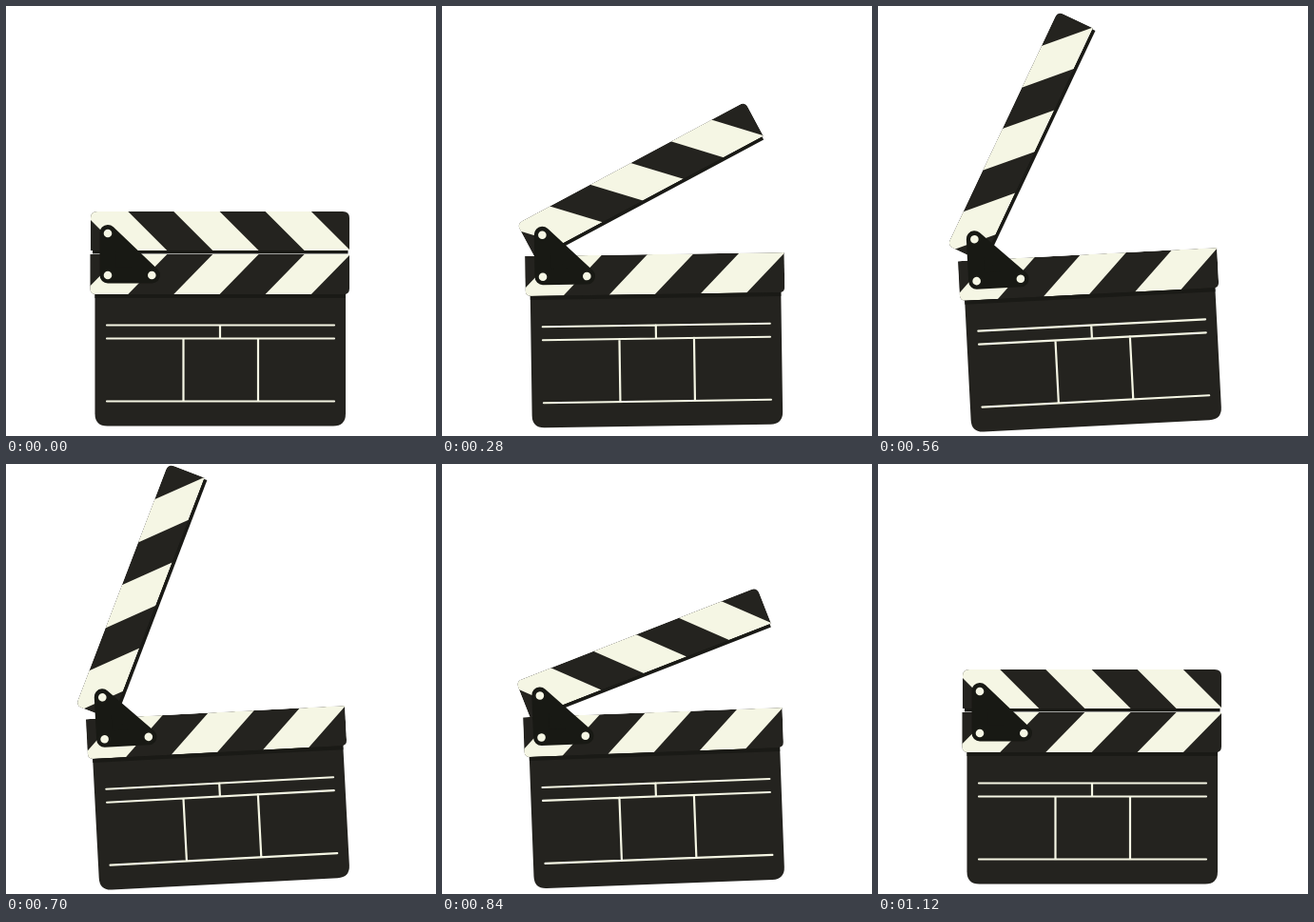
Recreate the animation shown at these times as an HTML page. Size 452 px wide and 452 px high, loop 1.75 s.

```html
<!DOCTYPE html>
<html lang="en">
<head>
<meta charset="utf-8">
<title>Clapperboard</title>
<style>
  html, body { margin: 0; width: 100%; height: 100%; overflow: hidden; background: #fff; }
  svg { display: block; width: 100%; height: 100%; }
  .dark { fill: #24231f; }
  .deep { fill: #1a1a16; }
  .cream { fill: #f5f6e4; }
  .chalk { fill: none; stroke: #f5f6e4; stroke-width: 2.2; stroke-linecap: round; }
  .bracket { fill: #181914; stroke: #181914; stroke-width: 17; stroke-linejoin: round; }
  #flash { stroke: #a0c424; stroke-linecap: round; }
</style>
</head>
<body>
<svg viewBox="0 0 452 452">
  <defs>
    <clipPath id="armShape"><path d="M89 257V223q0-7 7-7H354q7 0 7 7V257z"/></clipPath>
    <clipPath id="barShape"><path d="M88.5 261H361V297q0 6-6 6H94.5q-6 0-6-6z"/></clipPath>
  </defs>
  <g id="board">
    <path class="dark" d="M93.5 300H357V428.500q0 13-13 13H106.500q-13 0-13-13z"/>
    <rect class="deep" x="93.500" y="302" width="263.500" height="5"/>
    <path class="chalk" d="M106 335.500H345M106 349.500H345M106 415.500H345M225 335.500V349.500M186.500 349.500V415.500M265 349.500V415.500"/>
    <g clip-path="url(#barShape)">
      <rect class="dark" x="88" y="261" width="274" height="43"/>
      <path id="barStripes" class="cream"/>
    </g>
    <g id="arm">
      <rect class="deep" x="91" y="256" width="268.500" height="4.400"/>
      <g clip-path="url(#armShape)">
        <rect class="dark" x="88" y="215" width="274" height="43"/>
        <path id="armStripes" class="cream"/>
      </g>
    </g>
    <path class="bracket" d="M107 238.500V283H153.500z"/>
    <g class="cream">
      <circle cx="107" cy="239" r="4.300"/>
      <circle cx="107" cy="283" r="4.300"/>
      <circle cx="153.300" cy="283" r="4.300"/>
    </g>
  </g>
  <g id="flash"></g>
</svg>
<script>
const LOOP = 1750, STEP = 70;

// Degrees at each step: the arm swings open and snaps shut, the board leans along.
const ARM = [0, 1.6, 12.6, 27.3, 40.3, 50.1, 57, 61.8, 65, 66.1, 47, 19.2, 6, 1, 0.2, 0];
const LEAN = [0, 0, 0.2, 0.84, 1.6, 2.3, 2.75, 2.95, 3, 3, 2.95, 2.15, 0.75, 0, 0, 0];

// Ray: start, end, width
const RAYS = [
  [376, 238, 414, 205, 3],
  [396, 257, 470, 257, 10],
  [379, 280, 423, 307, 3.5]
];

const byId = id => document.getElementById(id);
const mix = (a, b, p) => a + (b - a) * p;

function stripes(y, height, topX, slant) {
  return [0, 1, 2].map(i => {
    const x = topX + i * 96.3;
    return `M${x} ${y}h48.300l${slant} ${height}h-48.300z`;
  }).join("");
}

byId("armStripes").setAttribute("d", stripes(216, 41, 80, 41));
byId("barStripes").setAttribute("d", stripes(261, 42, 121, -41));

function rays(from, to, scale) {
  return RAYS.map(([x1, y1, x2, y2, w]) =>
    `<line x1="${mix(x1, x2, from)}" y1="${mix(y1, y2, from)}" x2="${mix(x1, x2, to)}" y2="${mix(y1, y2, to)}" stroke-width="${w * scale}"/>`
  ).join("");
}

function flash(step) {
  if (step === 13) return rays(0, 1, 1);
  if (step === 14) return rays(0.6, 1.1, 0.5);
  return "";
}

let shown = -1;

function draw(time) {
  const step = Math.min(15, Math.max(0, Math.floor((time % LOOP) / STEP) - 1));
  if (step !== shown) {
    shown = step;
    byId("board").setAttribute("transform", `rotate(${-LEAN[step]} 225 351)`);
    byId("arm").setAttribute("transform", `rotate(${-ARM[step]} 107 239)`);
    byId("flash").innerHTML = flash(step);
  }
}

const start = performance.now();
function tick() {
  draw(performance.now() - start);
  requestAnimationFrame(tick);
}
tick();
</script>
</body>
</html>
```
